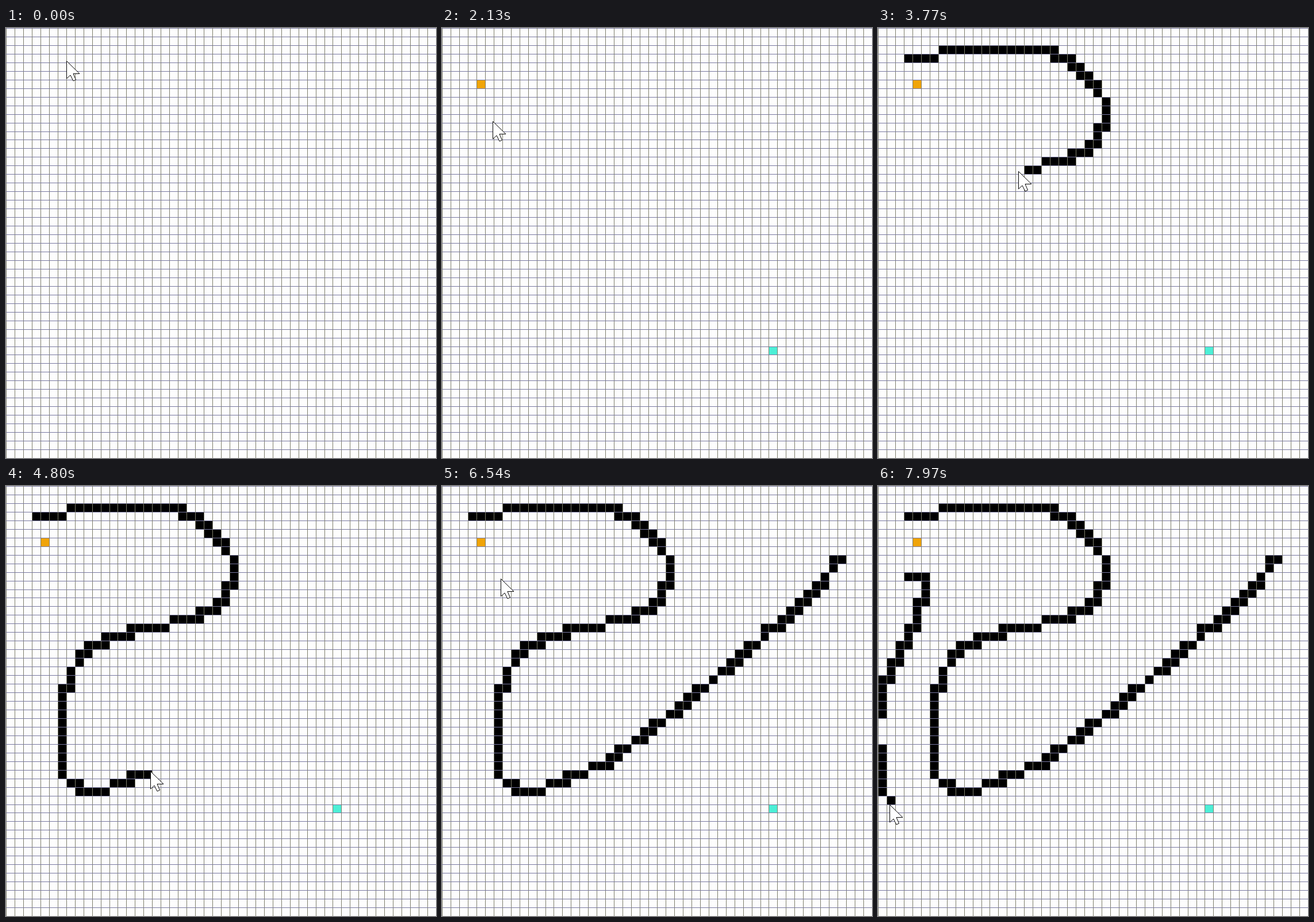
These frames come from a looping animation (748x748 px, 8 s). An HTML page with a canvas:

```html
<!DOCTYPE html>
<html lang="en">
<head>
<meta charset="utf-8">
<title>Grid drawing</title>
<style>
  html, body { margin: 0; width: 100%; height: 100%; overflow: hidden; background: #fdfdfd; }
  canvas { display: block; width: 748px; height: 748px; }
</style>
</head>
<body>
<canvas id="stage" width="748" height="748"></canvas>
<script>
const ctx = document.getElementById('stage').getContext('2d');
const SIZE = 748, ROWS = 50, GAP = SIZE / ROWS, LOOP = 8000;
const arrow = new Path2D('M0 0V30.5L6.5 24.5L11.5 34.5L16 32.5L11.5 22H22.5Z');

// Walks a compass-like route ("R3 UR D2") and lists every cell it enters.
function walk(col, row, route) {
  const cells = [[col, row]];
  for (const [, dir, count] of route.matchAll(/([UDLR]+)(\d*)/g)) {
    for (let i = 0; i < (+count || 1); i++) {
      col += dir.includes('R') - dir.includes('L');
      row += dir.includes('D') - dir.includes('U');
      cells.push([col, row]);
    }
  }
  return cells;
}

const walls = [
  ...walk(3, 3,
    'R3 UR R13 D R2 D R D R D R D DR D3 L D2 L D L2 D L3 DL L4 D L3 D L2 D L D DL D2 L D10 ' +
    'DR R D R3 UR R2 U R2 UR R2 U R U R UR R U R U R UR R U R U R U R UR UR R U R U R U R ' +
    'UR U R2 U R U R U R U R U R U UR U R'),
  ...walk(3, 10, 'R2 D3 L D3 L D2 L D2 L D2 L D4'),
  ...walk(0, 30, 'D5 DR')
];

const markers = [
  { cell: [4, 6], from: 780, color: '#f0a408' },
  { cell: [38, 37], from: 1470, color: '#4cefd6' }
];

// Pointer keys: time, x, y, number of cells drawn so far.
const keys = `
  0 105 57 0|120 105 57 0|660 67 97 0|900 67 97 0|1150 330 330 0|1400 578 566 0
  1470 576 562 0|1510 576 562 0|1630 378 393 0|1850 190 235 0|2150 85 160 0|2480 62 135 0
  2680 48 52 0|2760 52 51 1|2870 97 46 4|3170 308 40 18|3300 369 90 25|3420 394 143 31
  3520 386 190 34|3770 245 249 45|3940 168 272 52|4130 112 312 59|4250 99 355 62
  4480 97 495 72|4560 115 520 74|4640 160 533 78|4800 251 496 84|5000 338 445 92
  5400 513 300 110|5800 690 125 132|5930 690 125 132|6250 330 196 132|6540 102 161 132
  6740 60 158 132|6800 50 157 133|6900 81 160 135|7050 78 200 138|7300 52 262 144
  7450 20 320 151|7570 3 365 154|7640 0 395 156|7710 0 447 156|7730 2 455 157
  7870 6 528 162|7970 20 554 163|8000 20 554 163`
  .trim().split(/[|\n]/).map(line => line.trim().split(' ').map(Number));

// Tangent that never overshoots a turning point.
function slope(i, axis) {
  const a = keys[i - 1], b = keys[i], c = keys[i + 1];
  if (!a || !c) return 0;
  const before = (b[axis] - a[axis]) / (b[0] - a[0]);
  const after = (c[axis] - b[axis]) / (c[0] - b[0]);
  return before * after <= 0 ? 0 : 2 * before * after / (before + after);
}

function pose(t) {
  const i = Math.max(1, keys.findIndex(key => key[0] > t)) - 1;
  const a = keys[i], b = keys[i + 1], span = b[0] - a[0], u = (t - a[0]) / span;
  const ease = u * u * (3 - 2 * u);
  const at = axis => Math.round(
    a[axis] + (b[axis] - a[axis]) * ease +
    span * u * (1 - u) * ((1 - u) * slope(i, axis) - u * slope(i + 1, axis)));
  return { x: at(1), y: at(2), drawn: Math.floor(a[3] + (b[3] - a[3]) * u + 1e-6) };
}

const edge = n => Math.round(n * GAP);

function fillCell([col, row], color) {
  ctx.fillStyle = color;
  ctx.fillRect(edge(col), edge(row), edge(col + 1) - edge(col), edge(row + 1) - edge(row));
}

function drawGrid() {
  for (let i = 0; i < ROWS; i++) {
    ctx.fillStyle = '#7d7d6c';
    ctx.fillRect(edge(i), 0, 1, SIZE);
    ctx.fillStyle = '#7878a0';
    ctx.fillRect(0, edge(i), SIZE, 1);
  }
}

function drawPointer(x, y) {
  ctx.save();
  ctx.translate(x + 0.5, y + 0.5);
  ctx.fillStyle = '#fff';
  ctx.strokeStyle = '#000';
  ctx.lineWidth = 1;
  ctx.fill(arrow);
  ctx.stroke(arrow);
  ctx.restore();
}

function render(now) {
  const t = now % LOOP, { x, y, drawn } = pose(t);
  ctx.fillStyle = '#fdfdfd';
  ctx.fillRect(0, 0, SIZE, SIZE);
  for (const { cell, from, color } of markers) if (t >= from) fillCell(cell, color);
  for (const cell of walls.slice(0, drawn)) fillCell(cell, '#000');
  drawGrid();
  drawPointer(x, y);
}

const start = performance.now();
function tick() {
  render(performance.now() - start);
  requestAnimationFrame(tick);
}
tick();
</script>
</body>
</html>
```
